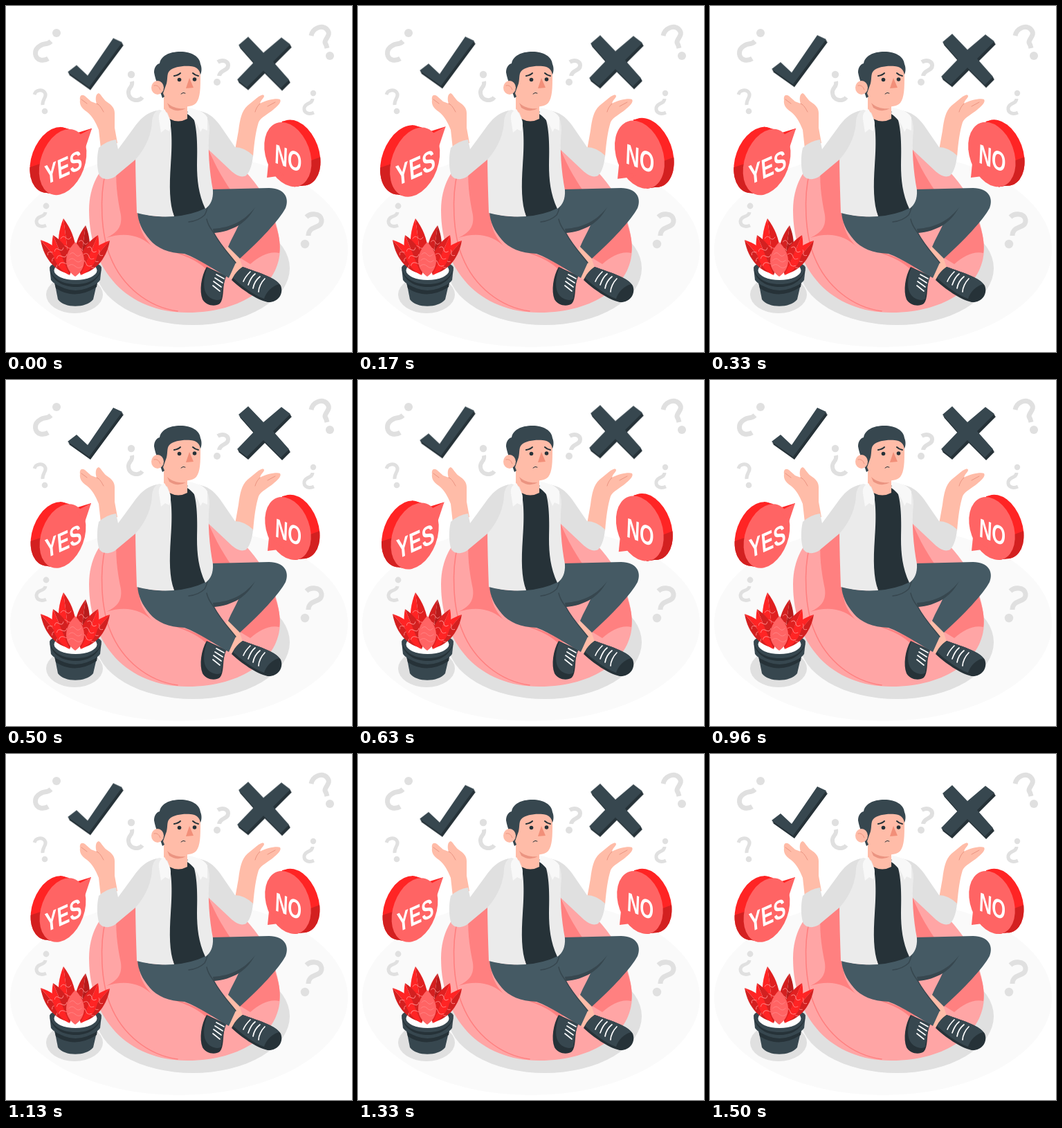
Write an HTML page that moves like this. It is 500x500 px and loops after 1.54 s.

```html
<!DOCTYPE html>
<html lang="en">
<head>
<meta charset="utf-8">
<title>Yes or no</title>
<style>
html, body { margin: 0; width: 100%; height: 100%; overflow: hidden; background: #fff; }
svg { display: block; width: 100vw; height: 100vh; }
text { font: 700 38px "Liberation Sans", Arial, sans-serif; fill: #fff; text-anchor: middle; }
.line { fill: none; stroke-linecap: round; stroke-linejoin: round; }
.pale { fill: #e0e0e0; }
.slate { fill: #37474f; }
.night { fill: #263238; }
.pants { fill: #455a64; }
.skin { fill: #ffbca8; }
.fold { stroke: #eb9481; stroke-width: 1; }
.shade { fill: #ff8080; }
#yes { transform-origin: 79.5px 223.5px; }
#no { transform-origin: 414px 212.5px; }
</style>
</head>
<body>
<svg viewBox="0 0 500 500">
  <defs>
    <path id="tick" d="M89 96 102 86 118 101 155 47 168 53 120 118Z"/>
    <path id="cross" d="M336 57 350 45 372 68 398 46 411 56 386 81 409 107 397 119 372 94 348 118 334 107 358 82Z"/>
    <g id="yesSide">
      <ellipse rx="31" ry="48" transform="translate(69 222.5) rotate(20)"/>
      <path d="M78 176 91 179 73 271 60 269Z"/>
    </g>
    <g id="noSide">
      <ellipse rx="31" ry="48" transform="translate(420 212) rotate(-20)"/>
      <path d="M399 168 411 166 429 258 417 260Z"/>
    </g>
    <clipPath id="yesLow"><path d="M20 238 50 228 90 290H20Z"/></clipPath>
    <clipPath id="noLow"><path d="M440 223 470 212V280H400Z"/></clipPath>
  </defs>

  <ellipse cx="250" cy="352" rx="244" ry="141" fill="#fafafa"/>
  <ellipse class="pale" cx="270" cy="379" rx="140" ry="82"/>
  <ellipse class="pale" cx="99" cy="417" rx="41" ry="27"/>
  <g id="marks" class="line" stroke="#e0e0e0"></g>

  <!-- bean bag -->
  <path fill="#ffa5a5" d="M250 190C180 190 120 225 120 295C120 382 175 443 262 443C342 443 396 403 396 350C394 300 365 252 325 220C300 200 270 190 250 190Z"/>
  <path class="shade" d="M160 232 192 205V300C192 322 198 334 214 350C196 331 172 326 145 335C162 327 168 318 166 302C160 274 158 250 160 232Z"/>
  <path class="shade" d="M290 200C298 222 310 245 326 268H294Z"/>
  <path class="shade" d="M386 308C395 328 397 345 395 357C380 354 366 362 353 373L335 362Z"/>
  <path class="shade" d="M222 350C250 354 282 366 322 392L300 378 289 380C275 366 250 357 222 350Z"/>
  <path class="line" stroke="#ff8080" stroke-width="1.6" d="M144 240C135 275 137 330 151 363C168 405 205 435 248 441"/>

  <!-- shoes, ankles, legs -->
  <path class="skin" d="M320 347 337 363 342 378 331 377 316 357ZM330 372 344 378 338 389 324 395 320 388Z"/>
  <path class="night" d="M290 377C282 390 279 412 284 424C289 433 302 435 309 430C315 424 313 408 316 396L318 390Z"/>
  <path class="slate" d="M291 378C286 390 284 406 289 415C295 425 307 427 311 423C313 410 315 399 318 391Z"/>
  <path class="line" stroke="#fff" stroke-width="1.7" d="M304 388 315 394M302 393 313 400M300 398 311 406M299 404 309 412"/>
  <path class="night" d="M342 377C362 384 391 393 397 404C402 417 392 429 378 428C361 424 340 409 326 396C330 388 336 381 342 377Z"/>
  <path class="slate" d="M342 377C362 384 389 392 395 402C385 404 376 413 373 423C358 418 340 404 328 393C331 386 336 381 342 377Z"/>
  <path class="line" stroke="#fff" stroke-width="1.7" d="M353 384C349 388 345 393 343 398M360 387C355 391 352 397 350 403M367 391C362 395 358 402 357 408M374 394C369 399 365 407 365 413"/>
  <path class="pants" d="M243 303 298 265 380 263C402 263 410 277 404 292C395 309 367 339 338 365L321 348C326 336 332 326 336 317C320 324 308 327 298 328L250 320Z"/>
  <path class="slate" d="M300 328C314 327 326 323 336 317C346 311 353 303 360 291C344 311 326 320 299 322Z"/>
  <path class="pants" d="M190 298C215 307 240 305 262 299C276 294 288 288 294 280C292 300 288 308 300 327C308 342 320 356 332 371L322 393C300 381 280 366 258 358C235 357 218 350 208 338C196 324 191 312 190 298Z"/>
  <path class="line" stroke="#37474f" stroke-width="1.5" d="M298 274C291 279 293 293 287 302C281 308 274 311 264 312M290 308C292 318 297 323 301 329C309 344 320 356 332 371"/>

  <!-- hands -->
  <path class="skin" d="M137 206 134 179C130 169 125 159 117 153C109 148 106 142 107 136C106 130 109 127 114 130L123 138 131 141C129 136 129 127 134 126C137 127 140 134 145 138C153 143 157 148 157 155V176L161 198Z"/>
  <path class="line fold" d="M131 141C136 143 138 148 141 153M109 135 117 141"/>
  <path class="skin" d="M331 208 336 180C338 165 340 152 349 144L360 135C367 129 372 127 373 130C373 133 368 136 367 141C376 136 391 133 396 135C399 139 391 146 386 150C379 156 368 161 365 168C361 181 359 195 357 218Z"/>
  <path class="line fold" d="M367 141C363 145 361 149 360 153M389 139 378 145"/>

  <!-- torso -->
  <path class="night" d="M236 160 262 152 274 157C278 185 276 225 280 250L289 292Q268 302 243 304L234 280Z"/>
  <path class="skin" d="M228 128V150L236 163Q249 170 262 163V142Z"/>
  <path fill="#eb9481" d="M233 140C240 147 250 149 260 148Q248 155 236 147Z"/>
  <path class="pale" d="M276 151C291 153 300 160 309 172L331 204Q344 204 357 216C356 228 353 239 347 245C340 249 332 244 325 238L290 205Z"/>
  <path fill="#ebebeb" d="M272 150C288 152 294 162 294 180C291 205 294 240 299 266Q300 285 288 293C278 272 276 250 276 230C277 195 276 172 268 153Z"/>
  <path fill="#ebebeb" d="M222 150 233 154C241 170 240 205 238 230C236 260 236 285 243 304Q214 306 189 299C188 270 187 240 187 212L196 168Q205 153 222 150Z"/>
  <path class="pale" d="M218 151C203 154 193 164 184 177L162 207 159 193Q145 195 134 205C131 218 131 234 135 245C140 252 150 251 157 247L187 222C203 205 211 182 211 166Q212 156 218 151Z"/>
  <path fill="#f8f8f8" d="M229 149C222 152 220 158 221 164L224 183 230 178 236 181Q240 169 236 162Z"/>
  <path fill="#f8f8f8" d="M263 147C276 149 287 153 291 161L291 180 284 177 281 182C277 170 271 162 262 156Z"/>

  <!-- head -->
  <path class="slate" d="M226 133C222 120 216 108 214 96C214 88 218 84 222 83C224 72 236 66 252 66C268 66 280 73 281 84C283 88 283 95 281 99L260 108 236 126Z"/>
  <path class="skin" d="M232 112C234 104 232 97 237 93C243 88 255 86 267 87C276 88 280 92 281 100C281 118 281 132 275 140C269 147 250 147 241 142C233 138 229 132 227 126Z"/>
  <ellipse class="skin" cx="219" cy="118" rx="9" ry="10"/>
  <path class="line fold" d="M214 115Q220 113 223 121"/>
  <path fill="#f28f79" d="M265 104 271 118 260 119Z"/>
  <circle class="night" cx="250.500" cy="106.500" r="2.800"/>
  <circle class="night" cx="272.500" cy="106" r="2.800"/>
  <path class="line" stroke="#263238" stroke-width="2" d="M243 101Q249 100 252 97M270 97Q273 100 278 101"/>
  <path class="line" stroke="#263238" stroke-width="1" d="M253 127Q256 124 259 126"/>

  <!-- plant -->
  <path class="slate" d="M70 398 75 424C84 437 116 437 126 424L132 398Z"/>
  <path class="night" d="M70 400Q100 422 132 400L131 406Q100 426 72 408Z"/>
  <path class="slate" d="M63 378C67 364 134 364 138 378L136 396C125 413 77 413 65 396Z"/>
  <path class="night" d="M63 378C66 392 78 402 101 402C123 402 135 392 138 378L137 384C130 400 116 406 101 406C85 406 70 400 64 384Z"/>
  <ellipse cx="100.500" cy="382" rx="31" ry="14" fill="#fff"/>
  <g id="plant"></g>

  <g id="yes">
    <use href="#yesSide" fill="#ff2424"/>
    <use href="#yesSide" fill="#d32020" clip-path="url(#yesLow)"/>
    <path fill="#ff2424" d="M97 186 123 178 112 200Z"/>
    <g fill="#ff6464">
      <ellipse rx="31" ry="48" transform="translate(82 225.5) rotate(20)"/>
      <path d="M102 189 123 178 114 205Z"/>
    </g>
    <text transform="matrix(.69 -.31 .09 1 84 246)">YES</text>
  </g>

  <g id="no">
    <use href="#noSide" fill="#ff2424"/>
    <use href="#noSide" fill="#d32020" clip-path="url(#noLow)"/>
    <g fill="#ff6464">
      <ellipse rx="31" ry="47" transform="translate(407.500 214.500) rotate(-20)"/>
      <path d="M380 227 378 247 402 244Z"/>
    </g>
    <text transform="matrix(.67 .25 -.04 1 407.500 233)">NO</text>
  </g>

  <g class="float">
    <use href="#tick" class="night" x="2" y="4"/>
    <use href="#tick" class="night" x="1" y="2"/>
    <use href="#tick" class="slate"/>
  </g>
  <g class="float">
    <use href="#cross" class="night" x="2" y="4"/>
    <use href="#cross" class="night" x="1" y="2"/>
    <use href="#cross" class="slate"/>
  </g>
</svg>
<script>
const $ = sel => document.querySelector(sel);

function add(parent, tag, attrs) {
  const el = document.createElementNS('http://www.w3.org/2000/svg', tag);
  for (const key in attrs) el.setAttribute(key, attrs[key]);
  return parent.appendChild(el);
}

// Question marks: dot x, dot y, dot radius, line width, hook
const marks = [
  [73, 39, 6, 7, 'M65 51C59 57 56 53 50 57C39 63 41 76 50 78Q56 79 61 76'],
  [56, 152, 4.3, 5, 'M41 128C43 121 52 120 56 125C60 131 52 135 53 143'],
  [181, 99, 5.2, 6, 'M182 109C184 118 176 117 177 126C178 137 192 139 197 132'],
  [305, 110, 5, 6, 'M306 81C312 77 321 79 321 86C321 94 309 92 308 101'],
  [468, 72, 6, 7, 'M441 43C443 32 456 27 463 33C472 42 460 47 461 53Q463 56 464 61'],
  [444, 126, 4.2, 5, 'M443 134C443 142 433 139 431 147C430 155 438 157 445 154'],
  [432, 344, 6.2, 7, 'M434 305C440 299 454 299 456 309C457 323 437 316 437 332'],
  [58, 289, 4.4, 5, 'M57 298C56 306 45 302 44 311C44 318 51 320 58 317']
];
for (const [cx, cy, r, width, d] of marks) {
  add($('#marks'), 'circle', { cx, cy, r, fill: '#e0e0e0', stroke: 'none' });
  add($('#marks'), 'path', { d, 'stroke-width': width, 'stroke-linecap': 'butt' });
}

// A leaf from base to tip, with a shaded half and wavy veins
function leaf(bx, by, tx, ty, w, fill, dark) {
  const len = Math.hypot(tx - bx, ty - by);
  const turn = Math.atan2(tx - bx, by - ty) * 180 / Math.PI;
  const g = add($('#plant'), 'g', { transform: `translate(${bx} ${by}) rotate(${turn})` });
  const half = s => `M0 0C${s * w} ${-len * .2} ${s * w * 1.3} ${-len * .6} 0 ${-len}Z`;
  add(g, 'path', { d: half(-1), fill });
  add(g, 'path', { d: half(1), fill: dark });
  for (const k of [.3, .47, .64]) {
    const y = -len * k, v = w * (.85 - k * .5);
    add(g, 'path', {
      d: `M${-v} ${y}Q${-v / 2} ${y - 5} 0 ${y}T${v} ${y}`,
      class: 'line', stroke: '#ff8585', 'stroke-width': .9
    });
  }
}
leaf(93, 385, 83, 307, 14, '#ff2424', '#e02020');
leaf(106, 385, 115, 317, 12, '#d32020', '#b71c1c');
leaf(92, 387, 50, 338, 12, '#d32020', '#ff2424');
leaf(108, 387, 150, 339, 12, '#ff2424', '#d32020');
leaf(92, 389, 68, 331, 13, '#ff2424', '#d32020');
leaf(108, 389, 133, 331, 13, '#e02020', '#ff2424');
leaf(100, 391, 100, 341, 15, '#ff6464', '#ff6464');

const timing = { duration: 1540, delay: -40, iterations: Infinity };
const beat = [[0, 1], [.1, 1.1], [.3, 1], [.4, 1], [.5, 1.1], [.6, 1], [1, 1]]
  .map(([offset, s]) => ({ offset, transform: `scale(${s})` }));
const drift = [0, -10, 0].map(y => ({ transform: `translateY(${y}px)` }));

for (const el of document.querySelectorAll('#yes, #no')) el.animate(beat, timing);
for (const el of document.querySelectorAll('.float')) el.animate(drift, timing);
</script>
</body>
</html>
```
